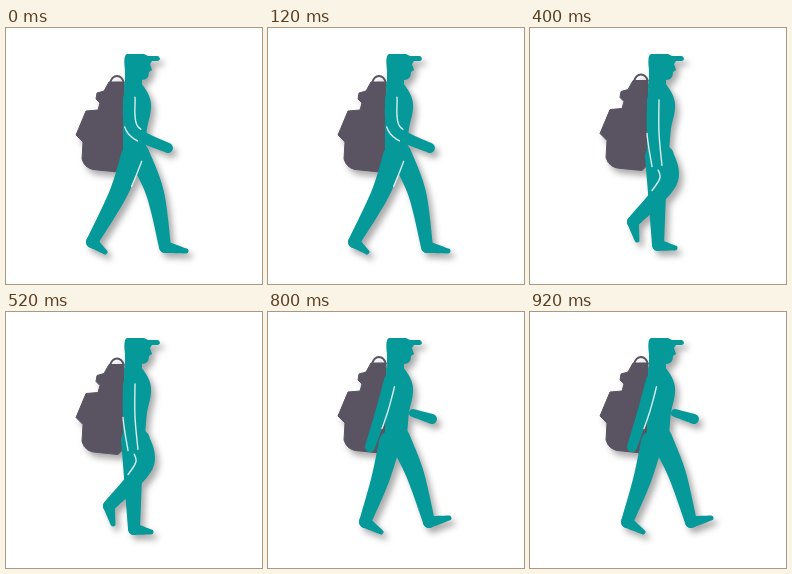
An HTML page that plays this animation: 256x256 px, repeating every 1 s.

```html
<!DOCTYPE html>
<html lang="en">
<head>
<meta charset="utf-8">
<title>Walking hiker</title>
<style>
html, body { margin: 0; height: 100%; overflow: hidden; background: #fff; }
svg { display: block; width: 100vw; height: 100vh; }
.pose { opacity: 0; filter: drop-shadow(4px 5px 3px rgba(0, 0, 0, .33)); }
.skin { fill: #05999a; }
.pack { fill: #595362; stroke: #595362; stroke-linejoin: round; }
.handle { fill: none; stroke: #595362; stroke-width: 2; }
.seam { fill: none; stroke: #d9ecec; stroke-width: 1.4; stroke-linecap: round; }
</style>
</head>
<body>
<svg id="stage" viewBox="0 0 256 256"></svg>
<script>
const STEP = 200;
const NS = 'http://www.w3.org/2000/svg';
const FRONT = 1, BACK = -1;

const HEAD = 'M119 62V42Q117 27 121 26H138L142 28H152Q156 31 152 33H146L144 36 146 42 143 44Q143 52 136 52V62Z';
const PACK = 'M118 54H103L98 63 91 65 90 71 94 75 92 82 80 83 70 107 77 114 76 131Q79 142 92 142L112 144 118 138Z';
const HANDLE = 'M104 55Q106 48 111 48T118 55';
const TORSO = [[127, 58], [131, 76], [129, 100], [128, 124]];

// Half widths along each kind of limb
const WIDTH = { torso: [9, 14, 12, 11], arm: [6, 6, 5], farArm: [4, 5], leg: [11, 9, 6], foot: [6, 2.5] };

// Legs: hip, knee, ankle, toe. Arms: shoulder, elbow, hand. Seams: limb, side, from, to.
const poses = [
  {
    lift: 0,
    lead: [[132, 125], [149, 165], [159, 219], [180, 223]],
    rear: [[126, 128], [112, 166], [86, 214], [99, 224]],
    arm: [[123, 70], [127, 102], [162, 120]],
    seams: [['arm', FRONT, 0, .6], ['arm', BACK, .4, .65], ['rear', FRONT, .05, .4]]
  },
  {
    lift: 1,
    lead: [[133, 125], [144, 165], [146, 217], [168, 222]],
    rear: [[130, 130], [127, 165], [95, 194], [102, 214]],
    arm: [[123, 70], [127, 103], [154, 126]],
    seams: [['arm', BACK, .4, .8], ['rear', FRONT, .05, .5]]
  },
  {
    lift: -1.5,
    lead: [[126, 128], [127, 165], [128, 217], [145, 220]],
    rear: [[133, 128], [138, 154], [103, 194], [107, 212]],
    arm: [[123, 72], [123, 105], [127, 138]],
    seams: [['arm', FRONT, 0, 1], ['arm', BACK, .5, 1], ['rear', BACK, .25, .7]]
  },
  {
    lift: -2.5,
    lead: [[132, 128], [150, 156], [152, 208], [171, 211]],
    rear: [[121, 130], [115, 168], [108, 212], [126, 217]],
    arm: [[122, 68], [115, 102], [105, 135]],
    farArm: [[149, 100], [163, 115]],
    seams: [['arm', FRONT, .15, .75]]
  },
  {
    lift: -3,
    lead: [[131, 126], [147, 162], [161, 210], [181, 206]],
    rear: [[122, 130], [112, 168], [97, 210], [113, 220]],
    arm: [[122, 68], [114, 98], [102, 135]],
    farArm: [[145, 101], [164, 107]],
    seams: [['arm', FRONT, .15, .75]]
  }
];

// Catmull-Rom value and slope through a, b, c, d at t
function spline(a, b, c, d, t) {
  const p = (c - a) / 2, q = (d - b) / 2, m = c - b;
  const u = 3 * m - 2 * p - q, v = p + q - 2 * m;
  return [b + t * (p + t * (u + t * v)), p + t * (2 * u + 3 * t * v)];
}

// Both edges of a tapered limb bent smoothly through its joints
function edges(joints, widths, steps = 12) {
  const last = joints.length - 1;
  const pts = joints.map(([x, y], i) => [x, y, widths[i]]);
  const at = i => pts[Math.max(0, Math.min(last, i))];
  const result = { [FRONT]: [], [BACK]: [] };
  for (let k = 0; k <= last * steps; k++) {
    const i = Math.min(last - 1, Math.floor(k / steps));
    const [[x, dx], [y, dy], [r]] = [0, 1, 2].map(j =>
      spline(at(i - 1)[j], at(i)[j], at(i + 1)[j], at(i + 2)[j], k / steps - i));
    const len = Math.hypot(dx, dy);
    for (const side of [FRONT, BACK]) {
      result[side].push([x + side * r * dy / len, y - side * r * dx / len]);
    }
  }
  return result;
}

function add(parent, tag, attrs) {
  const el = document.createElementNS(NS, tag);
  for (const key in attrs) el.setAttribute(key, attrs[key]);
  return parent.appendChild(el);
}

const path = (parent, cls, d) => add(parent, 'path', { class: cls, d });

function limb(parent, joints, kind) {
  const widths = WIDTH[kind];
  const e = edges(joints, widths);
  const back = [...e[BACK]].reverse();
  const cap = (r, to) => `A${r} ${r} 0 0 1 ${to}`;
  path(parent, 'skin', `M${e[FRONT].join('L')}${cap(widths.at(-1), back[0])}L${back.join('L')}${cap(widths[0], e[FRONT][0])}Z`);
  return e;
}

function leg(parent, joints) {
  limb(parent, joints.slice(2), 'foot');
  return limb(parent, joints.slice(0, 3), 'leg');
}

const stage = document.getElementById('stage');
const total = STEP * poses.length;

poses.forEach((pose, i) => {
  const g = add(stage, 'g', { class: 'pose' });
  const bag = add(g, 'g', { transform: `translate(0 ${pose.lift})` });
  path(bag, 'handle', HANDLE);
  path(bag, 'pack', PACK);
  if (pose.farArm) limb(g, pose.farArm, 'farArm');
  limb(g, TORSO, 'torso');
  path(g, 'skin', HEAD);
  const parts = {
    lead: leg(g, pose.lead),
    rear: leg(g, pose.rear),
    arm: limb(g, pose.arm, 'arm')
  };
  for (const [name, side, from, to] of pose.seams) {
    const line = parts[name][side];
    path(g, 'seam', 'M' + line.slice(from * line.length, to * line.length).join('L'));
  }

  const hold = 'step-end';
  g.animate([
    { opacity: 1, offset: 0, easing: hold },
    { opacity: 0, offset: 1 / poses.length, easing: hold },
    { opacity: 0, offset: 1 }
  ], { duration: total, delay: i * STEP - total, iterations: Infinity });
});
</script>
</body>
</html>
```
